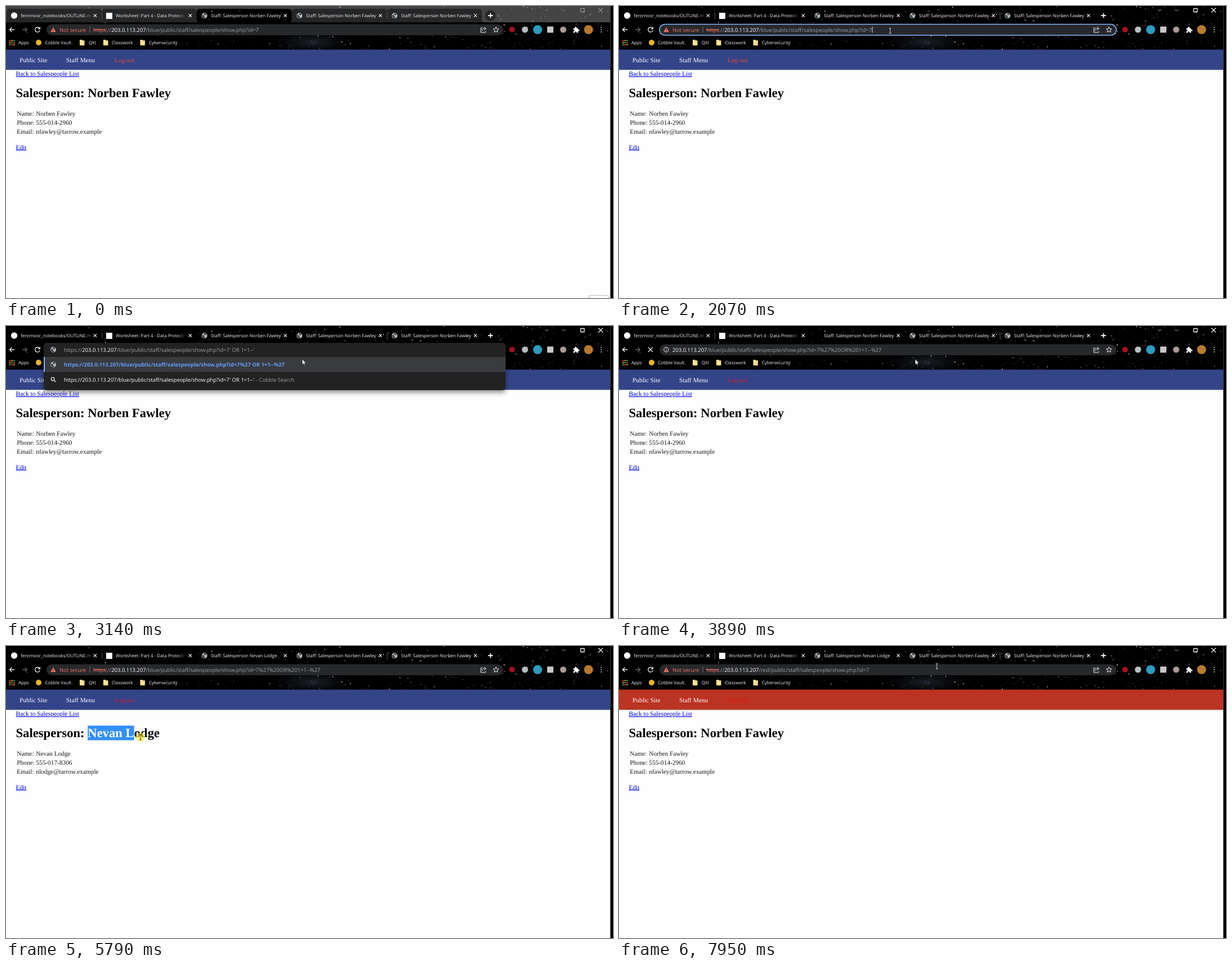
These frames come from a looping animation (1079 by 519 pixels, 8 s). An HTML page:

```html
<!DOCTYPE html>
<html lang="en">
<head>
<meta charset="utf-8">
<title>Staff page</title>
<style>
html, body { margin: 0; width: 100%; height: 100%; overflow: hidden; background: #000; }
svg { display: block; width: 1079px; height: 519px; }
text { white-space: pre; text-rendering: geometricPrecision; }
.ui { font: 8px "Open Sans", "Noto Sans", sans-serif; fill: #f1f1f1; }
.addr { font: 9.45px "Open Sans", "Noto Sans", sans-serif; fill: #9aa0a6; }
.page { font: 11.33px "Liberation Serif", serif; fill: #1a1a1a; }
.nav { fill: #fff; }
.link { fill: #0000ee; text-decoration: underline; }
.head { font: bold 22.66px "Liberation Serif", serif; fill: #000; }
.bright { fill: #fff; }
.warn { fill: #f0766a; }
.struck { text-decoration: line-through; }
.line { fill: none; stroke: #f1f1f1; stroke-width: 1.3; }
.dim { opacity: .4; }
</style>
</head>
<body>
<svg viewBox="0 0 1079 519" xmlns="http://www.w3.org/2000/svg">
  <defs>
    <linearGradient id="fade"><stop offset=".88" stop-color="#f1f1f1"/><stop offset="1" stop-color="#555"/></linearGradient>
    <radialGradient id="haze"><stop stop-color="#2a303c" stop-opacity=".7"/><stop offset="1" stop-color="#000" stop-opacity="0"/></radialGradient>
    <filter id="shadow" x="-5%" y="-20%" width="110%" height="150%"><feDropShadow dx="0" dy="4" stdDeviation="4" flood-opacity=".45"/></filter>
    <g id="globe">
      <circle r="5" fill="#b4b8bd"/>
      <path d="M-4-1.5Q-1-1.8-.6.4T1.6 3.2L.4 4.6Q-4 4-4.2-1ZM-.6-4.4Q2.4-4.6 3.4-2.6L1.4-.8-.4-1.6Z" fill="#33363a"/>
    </g>
    <path id="cross" d="M-2.6-2.6 2.6 2.6M2.6-2.6-2.6 2.6"/>
    <path id="folder" d="M0 1Q0 0 1 0H4L5 1.2H8.5V10H1Q0 10 0 9Z" fill="#ffe08c"/>
  </defs>

  <g id="idleBack">
    <rect width="1074" height="29" fill="#444"/>
  </g>
  <ellipse cx="545" cy="64" rx="90" ry="26" fill="url(#haze)"/>
  <g id="stars" fill="#fff"></g>
  <g id="idleTabs" fill="#252628"><circle cx="861" cy="17" r="9.5"/></g>

  <g id="tabs"></g>
  <path d="M170.5 11v12M677.5 11v12" stroke="#555"/>
  <circle cx="14.5" cy="17" r="5.7" fill="#fff"/>
  <rect x="178" y="12" width="11" height="11" fill="#fff"/>
  <path class="line" style="stroke-width:1.8" d="M857 17h8.6M861.3 12.7v8.6"/>
  <g id="controls" class="line">
    <path d="M958 6l3 3 3-3M988 7.500h7" class="dim"/>
    <path d="M1021.500 4.500h6.500v6h-6.500z"/>
    <path d="M1053 3.500l8 8M1061 3.500l-8 8"/>
  </g>

  <path class="line" d="M15 42H6.500M10.500 38l-4 4 4 4"/>
  <path class="line dim" d="M29 42h8.500M33.500 38l4 4-4 4"/>
  <path id="reload" class="line" d="M59.500 39.500A4.300 4.300 0 1 0 60.200 43.200M60.300 37.400v3.200h-3.400"/>
  <path id="stop" class="line" d="M52 38l8 8M60 38l-8 8"/>

  <rect id="omni" x="72" y="32.500" width="812" height="19.500" rx="9.750" fill="#27282b" stroke="#8ab4f8" stroke-width="1.700"/>
  <rect id="allPicked" x="155" y="36" height="13" fill="#3f70b8"/>
  <g id="insecure">
    <path d="M84 37.500l4.700 8.700h-9.400z" class="warn"/>
    <path d="M84 40.500v2.800M84 44v1" stroke="#27282b"/>
    <text class="addr warn" x="95" y="45.500">Not secure</text>
    <path d="M149 37v10.500" stroke="#777"/>
  </g>
  <g id="info"><circle cx="84" cy="42" r="4.300" class="line" style="stroke-width:1"/><path d="M84 41.200v3.200M84 39.200v1.100" stroke="#eee"/></g>
  <text id="url" class="addr" y="45.500"><tspan id="scheme" class="warn struck"></tspan><tspan id="colon"></tspan><tspan id="host" class="bright"></tspan><tspan id="path"></tspan></text>
  <path class="line" style="stroke-width:1" d="M847 39h-3v8h8.500v-2.500M846 44.500q0-4.500 5-4.500M849.500 37.500l4 2.700-4 2.700"/>
  <path class="line" style="stroke-width:1" d="M871 37.300l1.400 3.200 3.500.3-2.700 2.300.9 3.500-3.100-1.900-3.100 1.900.9-3.500-2.700-2.300 3.500-.3z"/>

  <circle cx="899.500" cy="42" r="5" fill="#a3121c"/>
  <circle cx="922.500" cy="42" r="5.500" fill="#b5bec4"/>
  <circle cx="945" cy="42" r="8" fill="#2b9bc0"/>
  <rect x="962" y="36.500" width="11" height="11" rx="1" fill="#c8c8c8"/>
  <circle cx="990.500" cy="42" r="5.500" fill="#a99b98"/>
  <path d="M1008.500 39.500h3q-.6-2.800 1.300-2.800t1.300 2.800h2.900v2.600q2.600-.5 2.600 1.200t-2.600 1.200v3h-3q.2-2.200-1.200-2.200t-1.300 2.200h-3v-2.800q2-.2 2-1.300t-2-1.300z" fill="#fff"/>
  <circle cx="1035.500" cy="42" r="8" fill="#b9792e"/>
  <path d="M1058 37.200v1.600M1058 41.200v1.600M1058 45.200v1.600" stroke="#fff" stroke-width="1.700"/>

  <g id="apps"></g>
  <circle cx="58" cy="65" r="5" fill="#e8b62c"/>
  <use href="#folder" x="131" y="60"/><use href="#folder" x="173" y="60"/><use href="#folder" x="238.500" y="60"/>
  <g class="ui">
    <text x="22" y="68">Apps</text><text x="69" y="68">Cobble Vault</text><text x="147" y="68">QXI</text>
    <text x="188" y="68">Classwork</text><text x="254" y="68">Cybersecurity</text>
  </g>

  <rect y="113" width="1074" height="406" fill="#fefefe"/>
  <rect id="navBar" y="77.500" width="1074" height="36"/>
  <g class="page">
    <text class="nav" x="24" y="100.300">Public Site</text>
    <text class="nav" x="107" y="100.300">Staff Menu</text>
    <text id="logout" x="193" y="100.300">Log out</text>
    <text class="link" x="17.500" y="124">Back to Salespeople List</text>
    <text x="19.300" y="195">Name:</text><text id="name" x="53.300" y="195"></text>
    <text x="19.300" y="211">Phone:</text><text id="phone" x="53.300" y="211"></text>
    <text x="19.300" y="226.500">Email:</text><text id="email" x="53.300" y="226.500"></text>
    <text class="link" x="17.500" y="254.600">Edit</text>
  </g>
  <rect id="picked" y="141.500" height="26" fill="#3390ff"/>
  <text id="heading" class="head" x="17.500" y="162.300">Salesperson: <tspan id="nameOn" fill="#fff"></tspan><tspan id="nameOff"></tspan></text>
  <rect id="corner" x="1036.500" y="514.500" width="34" height="8" fill="#fff" stroke="#bbb"/>
  <path d="M1074 0h5v519h-5z"/>
  <path d="M1074.500 0v519" stroke="#3a3a3a"/>

  <g id="drop">
    <rect x="67" y="30" width="821" height="84" rx="5" fill="#202124" filter="url(#shadow)"/>
    <rect x="67" y="55" width="821" height="26.500" fill="#393b3f"/>
    <rect x="67" y="55" width="2" height="26.500" fill="#8ab4f8"/>
    <use href="#globe" x="84" y="42"/><use href="#globe" x="84" y="68.500"/>
    <path class="line" style="stroke-width:1.200" d="M85.500 96.500l3 3M86 94.200a2.900 2.900 0 1 0-5.800 0a2.900 2.900 0 1 0 5.800 0"/>
    <text id="typed" class="addr" x="103" y="45.500">https://<tspan class="bright">203.0.113.207</tspan><tspan id="typedPath"></tspan></text>
    <text id="match" class="addr" x="103" y="72" style="fill:#669df6;font-weight:700"></text>
    <text class="addr" x="103" y="98.700"><tspan id="query" class="bright"></tspan> - Cobble Search</text>
  </g>
  <path id="caret" d="M0 36.500v11" stroke="#ddd"/>

  <g id="cursor">
    <circle id="halo" r="8" fill="#ffe92e" opacity=".65"/>
    <path id="arrow" d="M0 0V9.600L2.200 7.500 3.700 11 5.200 10.300 3.700 7H6.800Z" fill="#fff" stroke="#222" stroke-width=".7"/>
    <path id="beam" d="M-2-4.500H2M0-4.500V4.500M-2 4.500H2" fill="none"/>
  </g>
</svg>
<script>
const LOOP = 8000;
const HOST = '203.0.113.207';
const PATH = '/blue/public/staff/salespeople/show.php?id=7';
const INJECTION = "' OR 1=1--'";
const FIRST = { name: 'Norben Fawley', phone: '555-014-2960', email: 'nfawley@tarrow.example' };
const SECOND = { name: 'Nevan Lodge', phone: '555-017-8306', email: 'nlodge@tarrow.example' };

const $ = id => document.getElementById(id);
const show = (id, on) => { $(id).style.display = on ? '' : 'none'; };
const put = (id, value) => { if ($(id).textContent !== value) $(id).textContent = value; };
const within = (t, [from, to]) => t >= from && t < to;

function add(parent, tag, attrs, text = '') {
  const node = document.createElementNS('http://www.w3.org/2000/svg', tag);
  for (const key in attrs) node.setAttribute(key, attrs[key]);
  node.textContent = text;
  return parent.appendChild(node);
}

let seed = 41;
const random = () => (seed = seed * 16807 % 2147483647) / 2147483647;

for (let i = 0; i < 560; i++) {
  const size = 0.6 + random() ** 4 * 1.2;
  add($('stars'), 'circle', {
    cx: 1072 * random() ** 0.55, cy: 77 * random(), r: size / 2 + 0.1, opacity: 0.2 + 0.75 * random() ** 1.5
  });
}

const tabShape = x => `M${x - 4} 29Q${x} 29 ${x} 24V11Q${x} 5 ${x + 6} 5H${x + 163}Q${x + 169} 5 ${x + 169} 11V24Q${x + 169} 29 ${x + 173} 29Z`;
const titles = ['fernmoor_notebooks/OUTLINE.m', 'Worksheet: Part 4 - Data Protecti'];
for (let i = 0; i < 5; i++) {
  const x = 1 + i * 169;
  if (i === 2) add($('idleBack'), 'path', { d: tabShape(x) });
  else add($('idleTabs'), 'path', { d: tabShape(x) });
  const title = titles[i] || 'Staff: Salesperson ' + FIRST.name;
  add($('tabs'), 'text', { id: 'title' + i, class: 'ui', x: x + 25.3, y: 20, fill: '#fff', style: i < 2 ? 'fill:url(#fade)' : '' }, title);
  add($('tabs'), 'use', { href: '#cross', x: x + 157.5, y: 17, class: 'line' });
  if (i > 1) add($('tabs'), 'use', { id: 'icon' + i, href: '#globe', x: x + 13.7, y: 17.3 });
}
add($('idleBack'), 'rect', { y: 29, width: 1074, height: 49 });

const dotColors = ['#e8453c', '#f2a33a', '#3cba54'];
for (let i = 0; i < 9; i++) {
  add($('apps'), 'rect', { x: 6 + i % 3 * 3.6, y: 60.5 + (i / 3 | 0) * 3.6, width: 2.3, height: 2.3, fill: dotColors[(i + (i / 3 | 0)) % 3] });
}

// start, end, steps, x, y
const moves = [
  [320, 1050, 10, 502, 61], [1130, 1310, 3, 484, 44], [1900, 2070, 3, 482, 44],
  [2320, 3140, 11, 526.5, 59], [4200, 4540, 5, 482, 124], [4640, 4890, 4, 126, 172],
  [4970, 5050, 2, 147, 158], [5380, 5790, 6, 239, 162], [5870, 6040, 3, 260, 163],
  [6120, 6200, 2, 273, 167], [6450, 7120, 9, 566, 30], [7200, 7280, 2, 570, 20],
  [7610, 7700, 2, 579, 20], [7860, 7950, 2, 565, 36]
];
const presses = [[1230, 1310], [1550, 1630], [1900, 1990], [5300, 6200], [6450, 6530], [7370, 7450]];

function pointer(t) {
  let x = 1034, y = 530;
  for (const [start, end, steps, toX, toY] of moves) {
    if (t < start) break;
    const step = Math.min(steps, Math.floor((t - start) / (end - start) * (steps - 1) + 0.01) + 1);
    x += (toX - x) * step / steps;
    y += (toY - y) * step / steps;
  }
  return { x, y };
}

function drawPointer(t, { x, y }, dropOpen) {
  const overText = !dropOpen && (y > 33 && y < 53 && x < 840 || y > 141 && y < 170 && x > 17 && x < 295);
  $('cursor').setAttribute('transform', `translate(${x} ${y})`);
  $('beam').setAttribute('stroke', y < 77 ? '#ccc' : '#333');
  show('beam', overText);
  show('arrow', !overText);
  show('halo', presses.some(span => within(t, span)));
}

function drawAddress(t, loading, loaded, red) {
  const payload = encodeURI(INJECTION).replace(/'/g, '%27');
  let path = PATH;
  if (red) path = PATH.replace('blue', 'red');
  else if (loading || loaded) path += payload;
  put('scheme', loading ? '' : 'https');
  put('colon', loading ? '' : '://');
  put('host', HOST);
  put('path', path);
  $('url').setAttribute('x', loading ? 95 : 155);
  show('insecure', !loading);
  show('info', loading);
  show('stop', loading);
  show('reload', !loading);
  $('omni').setAttribute('stroke-opacity', within(t, [1230, 2320]) ? 1 : 0);
  show('allPicked', within(t, [1230, 1550]));
  $('allPicked').setAttribute('width', $('url').getComputedTextLength());
}

function drawDrop(t, open) {
  show('drop', open);
  const count = Math.min(INJECTION.length, 1 + Math.floor((t - 2320) / 74));
  const path = PATH + (open ? INJECTION.slice(0, count) : '');
  const full = 'https://' + HOST + path;
  put('typedPath', path);
  put('query', full);
  put('match', full.replace(/'/g, '%27'));
  show('caret', within(t, [1550, 3140]) || within(t, [3640, 3810]));
  const caretX = open ? 103 + $('typed').getComputedTextLength() : 156 + $('url').getComputedTextLength();
  $('caret').setAttribute('transform', `translate(${caretX} 0)`);
}

function drawPage(t, x, loaded, red) {
  const person = loaded && !red ? SECOND : FIRST;
  put('name', person.name);
  put('phone', person.phone);
  put('email', person.email);
  put('title2', 'Staff: Salesperson ' + (loaded ? SECOND : FIRST).name);
  $('navBar').setAttribute('fill', red ? '#bb3322' : '#334488');
  $('logout').style.fill = red ? '#e8160c' : t < 3810 ? '#e4472f' : '#d41b2c';

  const { name } = person, label = 'Salesperson: '.length;
  put('nameOn', '');
  put('nameOff', name);
  const heading = $('heading');
  const left = 17.5 + heading.getSubStringLength(0, label);
  const edge = n => n ? heading.getSubStringLength(label, n) : 0;
  let count = 0;
  if (within(t, [5380, 6450])) {
    while (count < name.length && (t >= 6200 || left + edge(count + 1) <= x - 6)) count++;
  }
  $('picked').setAttribute('x', left);
  $('picked').setAttribute('width', edge(count));
  put('nameOn', name.slice(0, count));
  put('nameOff', name.slice(count));
}

function draw(t) {
  const open = within(t, [2320, 3810]);
  const loading = within(t, [3810, 4060]);
  const loaded = t >= 4060, red = t >= 7450, idle = t < 1130;
  const at = pointer(t);
  show('idleBack', idle);
  show('idleTabs', idle);
  $('controls').style.opacity = idle ? 0.4 : 1;
  show('corner', t < 80);
  show('icon2', !loading);
  drawAddress(t, loading, loaded, red);
  drawDrop(t, open);
  drawPage(t, at.x, loaded, red);
  drawPointer(t, at, open);
}

const began = performance.now();
function tick() {
  draw((performance.now() - began) % LOOP);
  requestAnimationFrame(tick);
}
tick();
</script>
</body>
</html>
```
